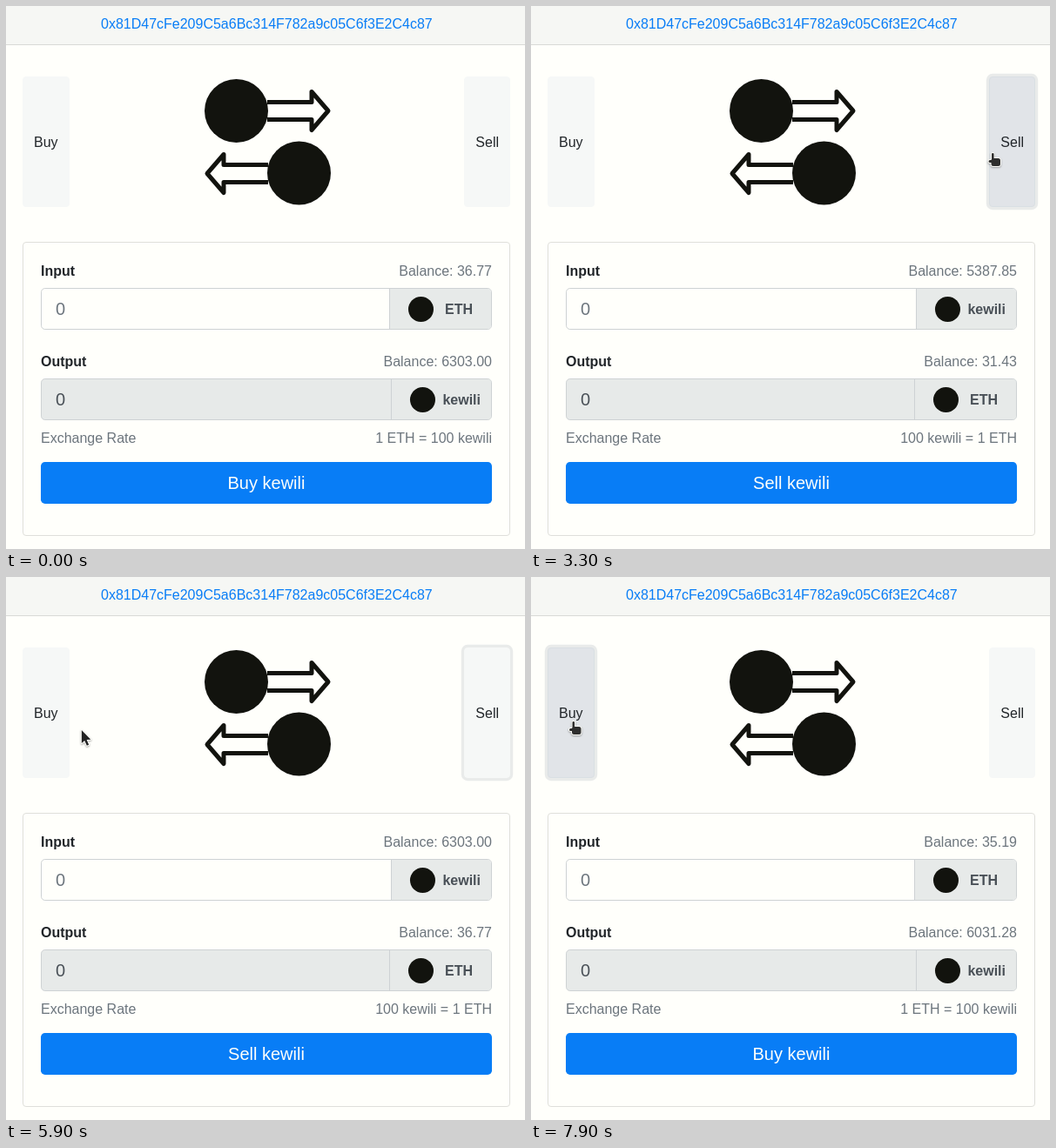
These frames come from a looping animation (596 by 624 pixels, 8 s). An HTML page with a canvas:

```html
<!DOCTYPE html>
<html lang="en">
<head>
<meta charset="utf-8">
<title>Token swap</title>
<style>
  html, body { margin: 0; width: 100%; height: 100%; overflow: hidden; background: #fffffb; }
  body { position: relative; font: 16px/24px "Liberation Sans", Arial, sans-serif; color: #212529; }
  div, canvas { position: absolute; box-sizing: border-box; white-space: pre; }
  #stage { left: 0; top: 0; width: 596px; height: 624px; overflow: hidden; }
  .bar { left: 0; top: 0; width: 596px; height: 45px; background: #f6f7f4; border-bottom: 1px solid #d9dad6; }
  .addr { left: 109px; top: 9px; color: #087df6; }
  .side { top: 81px; height: 150px; line-height: 150px; padding: 0 12px; border: 1px solid; border-radius: 4px; }
  #buy { left: 19px; }
  #sell { right: 17px; }
  .card { left: 19px; top: 271px; width: 560px; height: 338px; border: 1px solid #dfdfdb; border-radius: 4px; }
  .label { left: 40px; font-weight: bold; }
  .muted { color: #6c757d; }
  .right { right: 38px; }
  .field { left: 40px; width: 518px; height: 48px; border: 1px solid #ced2d4; border-radius: 4.8px;
           font-size: 20px; line-height: 46px; padding-left: 16px; overflow: hidden; }
  .unit { right: 0; top: 0; height: 46px; display: flex; padding: 2px 12px 0 21px; line-height: 44px;
          background: #e7eae9; border-left: 1px solid #ced2d4; font-size: 16px; font-weight: bold; color: #495057; }
  .unit i { width: 29px; height: 29px; margin-top: 7px; border-radius: 50%; background: #12130e; }
  .go { left: 40px; top: 524px; width: 518px; height: 48px; border-radius: 4.8px; background: #087df6;
        color: #fffffb; font-size: 20px; line-height: 48px; text-align: center; }
  canvas { left: 0; top: 0; pointer-events: none; }
</style>
</head>
<body>
<div id="stage">
  <div class="bar"></div>
  <div class="addr">0x81D47cFe209C5a6Bc314F782a9c05C6f3E2C4c87</div>
  <div class="side" id="buy">Buy</div>
  <div class="side" id="sell">Sell</div>
  <div class="card"></div>
  <div class="label" style="top:293px">Input</div>
  <div class="muted right" id="bal0" style="top:293px"></div>
  <div class="field" style="top:324px;color:#6c757d">0<div class="unit"><i></i><span id="unit0"></span></div></div>
  <div class="label" style="top:397px">Output</div>
  <div class="muted right" id="bal1" style="top:397px"></div>
  <div class="field" style="top:428px;color:#495057;background:#e7eae9">0<div class="unit"><i></i><span id="unit1"></span></div></div>
  <div class="muted" style="left:40px;top:485px">Exchange Rate</div>
  <div class="muted right" id="rate" style="top:485px"></div>
  <div class="go" id="go"></div>
  <canvas id="art" width="596" height="624"></canvas>
</div>
<script>
const $ = id => document.getElementById(id);
const ctx = $('art').getContext('2d');
const LOOP = 8000, STEP = 100, INK = '#12130e', PAPER = '#fffffb';

const ETH = { label: '   ETH  ', total: 36.774 };
const TOKEN = { label: '  kewili', total: 6302.996 };
const SELL_AT = 2550.7, BUY_AT = 6683.9, COUNT_MS = 2699.5;

const clamp = v => Math.max(0, Math.min(1, v));
const ramp = (t, start, ms = 150) => clamp((t - start) / ms);
const easeIn = k => k ** 3;
const easeOut = k => 1 - (1 - k) ** 2;
const easeInOut = k => k * k * (3 - 2 * k);

const HOME = { x: 74.5, y: 357.5 };
const MOVES = [
  { from: 1200, to: 1800, x: 486, y: 204, ease: easeInOut },
  { from: 1900, to: 2300, x: 536, y: 168, ease: easeOut },
  { from: 2600, to: 2800, x: 530, y: 168, ease: easeOut },
  { from: 4300, to: 5000, x: 462.5, y: 209, ease: easeIn },
  { from: 5000, to: 6100, x: 74, y: 175, ease: easeOut },
  { from: 6100, to: 6200, x: 48.5, y: 165, ease: easeOut }
];

function pointerAt(t) {
  let { x, y } = HOME;
  for (const m of MOVES) {
    const k = m.ease(ramp(t, m.from, m.to - m.from));
    x += (m.x - x) * k;
    y += (m.y - y) * k;
  }
  return { x, y };
}

// exponential ease-out counter
function countShare(ms) {
  return ms >= COUNT_MS ? 1 : (1 - 2 ** (-10 * ms / COUNT_MS)) * 1024 / 1023;
}

function disc(x, y, r) {
  ctx.fillStyle = INK;
  ctx.beginPath();
  ctx.arc(x, y, r, 0, Math.PI * 2);
  ctx.fill();
}

function trace(points, close) {
  ctx.beginPath();
  points.forEach(([x, y]) => ctx.lineTo(x, y));
  if (close) ctx.closePath();
}

function swapArrow(x, y, dir) {
  const half = [[0, -10], [51, -10], [51, -22]];
  const mirror = half.map(([px, py]) => [px, -py]).reverse();
  trace([...half, [70, 0], ...mirror].map(([px, py]) => [x + px * dir, y + py]));
  ctx.strokeStyle = INK;
  ctx.lineWidth = 5;
  ctx.lineJoin = 'round';
  ctx.stroke();
}

function outlined(fill) {
  ctx.save();
  ctx.shadowColor = 'rgba(0,0,0,.35)';
  ctx.shadowBlur = 2;
  ctx.shadowOffsetY = 1;
  ctx.lineJoin = 'round';
  ctx.lineWidth = 2;
  ctx.strokeStyle = PAPER;
  ctx.stroke();
  ctx.restore();
  ctx.fillStyle = fill;
  ctx.fill();
}

function arrowPointer() {
  trace([[0, 0], [0, 15], [3.4, 12], [6, 17.6], [8.3, 16.6], [5.8, 11], [10.5, 10.6]], true);
  outlined('#222');
}

function handPointer() {
  ctx.beginPath();
  ctx.roundRect(-1, 1, 2.6, 10, 1.3);
  ctx.roundRect(-1.5, 7, 10.5, 9, 2.5);
  ctx.roundRect(-4.5, 9, 6, 3, 1.5);
  outlined('#2e2e2e');
}

function textPointer() {
  for (const [w, color] of [[3, PAPER], [1.2, '#222']]) {
    ctx.strokeStyle = color;
    ctx.lineWidth = w;
    ctx.beginPath();
    ctx.moveTo(0, -7);
    ctx.lineTo(0, 7);
    for (const y of [-7, 7]) {
      ctx.moveTo(-3, y);
      ctx.lineTo(3, y);
    }
    ctx.stroke();
  }
}

function over({ x, y }, id) {
  const el = $(id);
  const dx = x - el.offsetLeft, dy = y - el.offsetTop;
  return dx >= 0 && dx <= el.offsetWidth && dy >= 0 && dy <= el.offsetHeight;
}

function drawPointer(p, hand) {
  ctx.save();
  ctx.translate(p.x, p.y);
  if (hand) handPointer();
  else if (p.x < 440 && p.y > 324) textPointer();
  else arrowPointer();
  ctx.restore();
}

function styleSide(id, hover, press, ring) {
  const s = $(id).style;
  s.background = press ? '#dde1e5' : hover ? '#e1e4e8' : '#f6f8f7';
  s.borderColor = press ? '#d3d8dd' : hover ? '#d9dfe3' : '#f6f8f7';
  s.boxShadow = `0 0 0 ${3.2 * ring}px rgba(212,216,217,${0.5 * ring})`;
}

function fillRow(i, unit, share) {
  $('bal' + i).textContent = 'Balance: ' + (unit.total * share).toFixed(2);
  $('unit' + i).textContent = unit.label;
}

function render(t) {
  const selling = t >= SELL_AT && t < BUY_AT;
  const share = t < SELL_AT ? 1 : countShare(t - (selling ? SELL_AT : BUY_AT));
  fillRow(0, selling ? TOKEN : ETH, share);
  fillRow(1, selling ? ETH : TOKEN, share);
  $('rate').textContent = selling ? '100 kewili = 1 ETH' : '1 ETH = 100 kewili';
  $('go').textContent = (selling ? 'Sell' : 'Buy') + ' kewili';

  const p = pointerAt(t);
  const onSell = over(p, 'sell'), onBuy = over(p, 'buy');
  const sellFocus = ramp(t, SELL_AT - 20), buyFocus = ramp(t, BUY_AT - 50);
  const pressed = f => f > 0 && f < 1;
  styleSide('sell', onSell, onSell && pressed(sellFocus), sellFocus - buyFocus);
  styleSide('buy', onBuy, onBuy && pressed(buyFocus), buyFocus);

  ctx.clearRect(0, 0, 596, 624);
  swapArrow(300, 120.5, 1);
  swapArrow(301, 192.5, -1);
  disc(264.5, 120.5, 36.5);
  disc(336.5, 192, 36.5);
  if (t >= MOVES[0].from) drawPointer(p, onSell || onBuy);
}

const start = performance.now();
function tick() {
  const t = (performance.now() - start) % LOOP;
  render(Math.floor(t / STEP) * STEP);
  requestAnimationFrame(tick);
}
tick();
</script>
</body>
</html>
```
